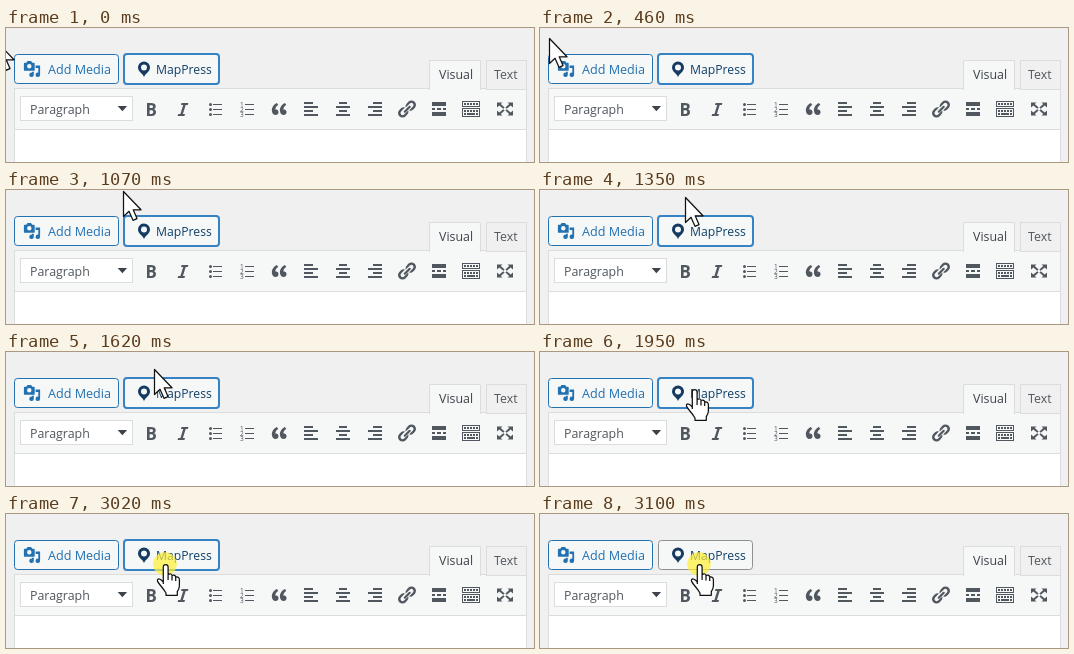
An HTML page for the animation above (4230 ms loop, 528 px wide and 134 px high).

```html
<!DOCTYPE html>
<html lang="en">
<head>
<meta charset="utf-8">
<title>Editor toolbar</title>
<style>
html, body { margin: 0; width: 100%; height: 100%; overflow: hidden; background: #f0f0f1; }
svg { display: block; }
text { font: 12.4px "Open Sans", "Noto Sans", sans-serif; }
#icons { fill: #50575e; }
.edge { stroke: #dcdcde; }
.button { fill: #f6f7f7; stroke: #2271b1; }
#focus { stroke: #3582c4; stroke-width: 2; }
#pressed { stroke: #8c8f94; }
.cursor { fill: #fff; stroke: #111; stroke-width: 1.25; stroke-linejoin: round; }
</style>
</head>
<body>
<svg width="528" height="134" viewBox="0 0 528 134">
  <g class="edge">
    <rect x="8.5" y="60.5" width="512" height="80" fill="#fff"/>
    <path d="M8.5 60.5h512v41H8.5z" fill="#f6f7f7"/>
    <rect x="480.5" y="32.5" width="40" height="29" fill="#f0f0f1"/>
    <path d="M423.5 62V32.5h51V62" fill="#f6f7f7"/>
    <rect x="14.5" y="68.5" width="112" height="24" fill="#fff"/>
  </g>
  <text x="433" y="51" fill="#3c434a">Visual</text>
  <text x="488" y="51" fill="#50575e">Text</text>
  <text x="24" y="86" fill="#50575e">Paragraph</text>
  <path d="M111.7 78h9.4l-4.7 5.3z" fill="#3c434a"/>

  <rect class="button" x="8.5" y="26.5" width="104" height="29" rx="3"/>
  <path transform="translate(17 32) scale(.9)" fill="#2271b1" fill-rule="evenodd" d="M13 11V4q0-1-1-1h-1.7L9 1H5L3.7 3H2Q1 3 1 4v7q0 1 1 1h10q1 0 1-1zM7 4.5a2.5 2.5 0 1 1 0 5a2.5 2.5 0 1 1 0-5zM14 6h5v10.5a2.5 2.5 0 1 1-2-2.45V9h-3zM10 14.05V13h2v3.5a2.5 2.5 0 1 1-2-2.45z"/>
  <text x="42" y="46" fill="#2271b1" style="font-size:12.6px">Add Media</text>

  <rect class="button" id="pressed" x="118.5" y="26.5" width="94" height="29" rx="3"/>
  <rect class="button" id="focus" x="118" y="26" width="95" height="30" rx="3"/>
  <path transform="translate(128 31.5)" fill="#163b63" fill-rule="evenodd" d="M10 2a6 6 0 0 0-6 6c0 2 1.2 3.7 2.5 4.9Q9 15 10 17.4Q11 15 13.5 12.9C14.8 11.7 16 10 16 8a6 6 0 0 0-6-6zm0 3a3 3 0 1 1 0 6a3 3 0 1 1 0-6z"/>
  <text x="150" y="46" fill="#0f4068" style="font-size:12.2px">MapPress</text>

  <g id="icons"></g>
  <circle id="glow" cx="159" cy="50" r="11.8" fill="#fff033" opacity=".7"/>
  <path class="cursor" id="arrow" d="M.5 .5V25.5L6 20.3L10 29.3L14 27.6L10.2 18.8H18z"/>
  <path class="cursor" id="hand" d="M7.3 20V3Q7.3 .7 9.7 .7T12.1 3V10.5Q15.4 9 16.1 11.5Q19.2 10.5 19.8 13Q23.4 12.5 23.4 16V22Q23.2 25 21.3 27.5V31.3H10V29Q7.5 25 4.5 21.5Q.6 17 1.6 15.5Q3.6 13.7 7.3 18M12.1 10.5V16M16 11.5V16.5M19.7 13V17"/>
</svg>
<script>
const $ = id => document.getElementById(id);
const box = (x, y, w, h) => `M${x} ${y}h${w}v${h}h${-w}z`;
const path = (d, more = '') => `<path fill-rule="evenodd" d="${d}" ${more}/>`;
const rows = [5, 10, 15];
const align = (x, w) => path([3, 7, 11, 15].map((y, i) => i % 2 ? box(3, y, 14, 2) : box(x, y, w, 2)).join(''));
const lines = path(rows.map(y => box(8, y, 9, 1)).join(''));
const quote = 'M9.5 13.2c0-2.2-1.5-2.9-3.1-2.6c-.3-1.7 1.1-3.8 2.9-4.7L7.9 4c-2.7 1.3-5.4 4.3-5 8C3.2 14.4 4.6 16 6.5 16s3-1.2 3-2.8z';
const keys = [3, 6, 9, 12, 15].map(x => box(x, 4, 2, 2) + box(x, 11, 2, 2)).join('');
const halfLink = 'M17.7 2.8c1.7 1.7 1.7 4.4 0 6.1l-1.5 1.5c-1.1 1.1-2.7 1.5-4.1 1.1L15.9 7.4c.8-.8.8-2.2 0-3c-.8-.9-2.2-.9-3 0L8.7 8.5c-.4-1.4 0-3 1.1-4.1l1.5-1.6c1.7-1.6 4.5-1.6 6.4 0z';

// Each icon lives in a 20 x 20 cell.
const icons = [
  path('M6 4v13h4.5c2.8 0 4.5-1.4 4.5-3.8c0-1.7-.8-2.7-2.2-3c1.2-.3 1.9-1.4 1.9-2.9C14.7 5 13 4 9.8 4zM8.6 9.1V6.3h1.3c1.5 0 2.1.4 2.1 1.4s-.6 1.4-2 1.4zM8.6 11.3h1.6c1.4 0 2.1.6 2.1 1.8s-.7 1.8-2 1.8H8.6z'),
  path('M14.8 6h-2.1l-2.8 9H12l-.6 2H4.6l.6-2h2.2l2.8-9H8l.6-2h6.8z'),
  lines + rows.map(y => `<circle cx="5.5" cy="${y + .5}" r="1.5"/>`).join(''),
  lines + rows.map((y, i) => `<text x="3" y="${y + 3}" style="font-size:6.5px">${i + 1}</text>`).join(''),
  path(quote) + path(quote, 'transform="translate(8.05)"'),
  align(3, 9), align(6, 8), align(8, 9),
  path(halfLink) + path(halfLink, 'transform="rotate(180 10 10)"')
    + path('M7.8 12.7L12.7 7.8', 'stroke="#50575e" stroke-width="2.2" stroke-linecap="round"'),
  path(box(3, 3, 14, 4) + box(3, 9, 3, 2) + box(8, 9, 4, 2) + box(14, 9, 3, 2) + box(3, 13, 14, 4)),
  path(box(1, 2, 18, 6) + box(2, 3, 16, 4) + box(1, 9, 18, 9) + box(2, 10, 16, 7) + keys + box(3, 14, 2, 2) + box(6, 14, 8, 2) + box(15, 14, 2, 2)),
  ['1 1', '-1 1', '1 -1', '-1 -1'].map(s =>
    path('M-8-6.5h5.5l-1.7 1.6L-.4-1.6L-1.7-.3L-5.7-3.5L-8-1.5z', `transform="translate(10 10) scale(${s})"`)).join('')
];
$('icons').innerHTML = icons.map((icon, i) =>
  `<g transform="translate(${i < 11 ? 135 + 32 * i : 489} 71)">${icon}</g>`).join('');

// Pointer track: step, x, y
const track = [
  [-1, -10, 13], [4, 37, 6], [7, 71, 6], [10, 117, 1], [12, 138, 2], [15, 148, 9],
  [18, 148, 17], [23, 154, 37], [24, 154, 42], [26, 157, 47], [28, 159, 50]
];
const LOOP = 4230, START = 390, STEP = 67.8;

function pointer(t) {
  const s = Math.max(-1, Math.min(28, Math.floor((t - START) / STEP)));
  const i = Math.max(1, track.findIndex(p => p[0] >= s));
  const [a, b] = [track[i - 1], track[i]];
  const k = (s - a[0]) / (b[0] - a[0]);
  return [1, 2].map(n => Math.round(a[n] + (b[n] - a[n]) * k));
}

const show = (id, on) => $(id).style.display = on ? '' : 'none';

function draw(now) {
  const t = now % LOOP;
  const [x, y] = pointer(t);
  const over = t > 1500 && y >= 25;
  show('arrow', !over);
  show('hand', over);
  $('arrow').setAttribute('transform', `translate(${x} ${y})`);
  $('hand').setAttribute('transform', `translate(${x - 9} ${y})`);
  show('glow', t >= 3020);
  show('focus', t < 3100);
  show('pressed', t >= 3100);
}

const begin = performance.now();
function tick() {
  draw(performance.now() - begin);
  requestAnimationFrame(tick);
}
tick();
</script>
</body>
</html>
```
